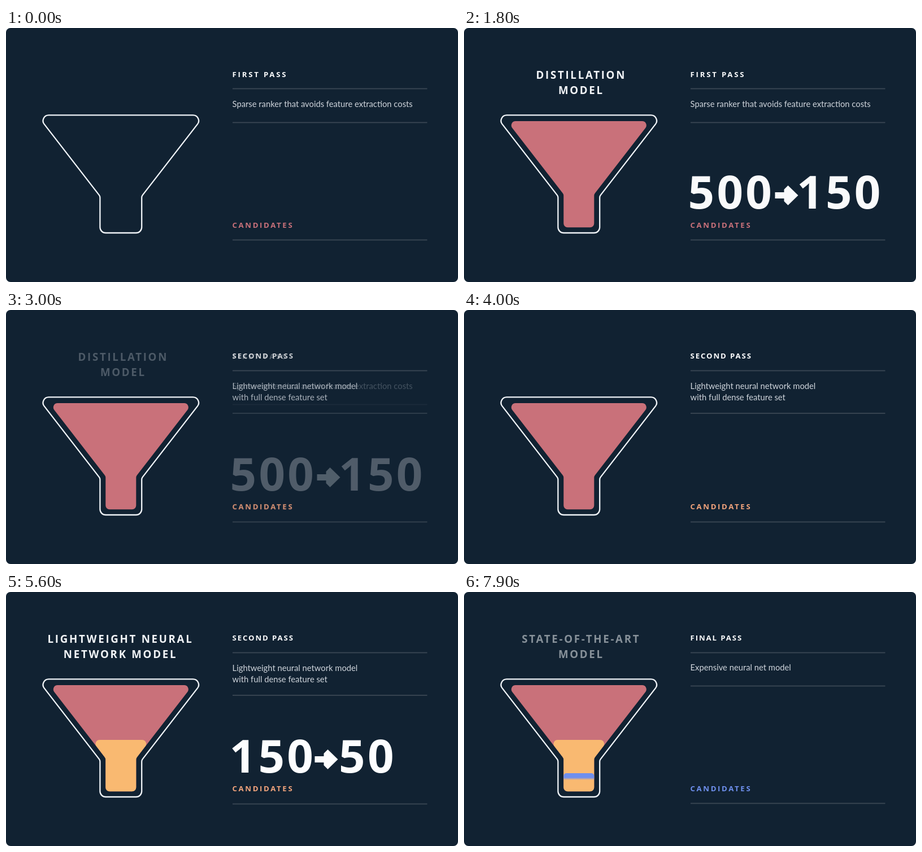
An HTML page with a canvas for the animation above (8000 ms loop, 800 by 450 pixels).

```html
<!DOCTYPE html>
<html lang="en">
<head>
<meta charset="utf-8">
<title>Ranking funnel</title>
<style>
  html, body { margin: 0; width: 100%; height: 100%; overflow: hidden; background: #fff; }
  canvas { display: block; }
</style>
</head>
<body>
<canvas id="stage" width="800" height="450"></canvas>
<script>
const ctx = document.getElementById('stage').getContext('2d');

const LOOP = 8000;
const PERIOD = 3452;
const CENTER = 203.3;
const BACK = '#112232', WHITE = '#fcfdfe', BODY = '#cfd5dc', RULE = '#3a4754';
const LABEL_FONT = '700 13.2px "Open Sans", sans-serif';
const TITLE_FONT = '700 18.7px "Open Sans", sans-serif';
const BODY_FONT = '400 14.75px Lato, sans-serif';
const NUMBER_FONT = '700 81.5px "Open Sans", sans-serif';

const passes = [
  {
    title: ['DISTILLATION', 'MODEL'], titleX: 206,
    label: 'FIRST PASS', labelY: 87, labelGap: 2.8,
    body: ['Sparse ranker that avoids feature extraction costs'], bodyY: 140,
    rules: [167.5, 375.5], accent: '#c9717a', candidatesY: 353.6,
    number: { from: '500', to: '150', x: 396.5, arrowX: 550.5 },
    fill: { color: '#c9717a', top: 165, half: 127.2, radius: 7.4 }
  },
  {
    title: ['LIGHTWEIGHT NEURAL', 'NETWORK MODEL'], titleX: 201.2,
    label: 'SECOND PASS', labelY: 85.7, labelGap: 1.9,
    body: ['Lightweight neural network model', 'with full dense feature set'], bodyY: 140,
    rules: [183, 375.5], accent: '#f2a47c', candidatesY: 352.6,
    number: { from: '150', to: '50', x: 395.5, arrowX: 546.5 },
    fill: { color: '#f9b971', top: 262, half: 52, radius: 7 }
  },
  {
    title: ['STATE-OF-THE-ART', 'MODEL'], titleX: 206,
    label: 'FINAL PASS', labelY: 85.7, labelGap: 1.9,
    body: ['Expensive neural net model'], bodyY: 139,
    rules: [166.5, 374.5], accent: '#6f90ee', candidatesY: 352.6,
    fill: { color: '#6f8fee', top: 321, half: 27, radius: 5 }
  }
];

// Sine ease from 0 to 1, clamped at both ends.
function ease(t, start, duration) {
  const x = Math.min(1, Math.max(0, (t - start) / duration));
  return (1 - Math.cos(Math.PI * x)) / 2;
}

function text(str, x, y, font, color, gap = 0, align = 'left') {
  ctx.font = font;
  ctx.letterSpacing = gap + 'px';
  ctx.textAlign = align;
  ctx.fillStyle = color;
  ctx.fillText(str, x, y);
}

function rule(y) {
  ctx.fillStyle = RULE;
  ctx.fillRect(401, y - 0.9, 344.5, 1.8);
}

// Points are [x, y, corner radius].
function roundedPath(points) {
  const [last, first] = [points[points.length - 1], points[0]];
  ctx.beginPath();
  ctx.moveTo((last[0] + first[0]) / 2, (last[1] + first[1]) / 2);
  points.forEach(([x, y, r], i) => {
    const next = points[(i + 1) % points.length];
    ctx.arcTo(x, y, next[0], next[1], r);
  });
  ctx.closePath();
}

function funnelPath(top, half, radius, neck, shoulder, bottom, bottomRadius) {
  const right = [[half, top, radius]];
  if (half > neck) right.push([neck, shoulder, 7]);
  right.push([neck, bottom, bottomRadius]);
  const left = right.map(([x, y, r]) => [-x, y, r]).reverse();
  roundedPath([...right, ...left].map(([x, y, r]) => [CENTER + x, y, r]));
}

function drawOutline() {
  funnelPath(154.3, 148.1, 10, 36.9, 298, 363, 10);
  ctx.strokeStyle = '#f0f4f8';
  ctx.lineWidth = 2.3;
  ctx.stroke();
}

// Fills downward behind a feathered edge proportional to the height.
function drawFill({ color, top, half, radius }, progress) {
  if (progress <= 0) return;
  const bottom = 353.3, height = bottom - top, feather = height * 0.13;
  const edge = top + (height + feather) * progress;
  ctx.fillStyle = color;
  if (progress < 1) {
    const gradient = ctx.createLinearGradient(0, edge - feather, 0, edge);
    gradient.addColorStop(0, color);
    gradient.addColorStop(1, color + '00');
    ctx.fillStyle = gradient;
  }
  funnelPath(top, half, radius, 27, 294.6, bottom, 7);
  ctx.fill();
}

function drawArrow(x) {
  const upper = [[0, 5.5], [16, 5.5], [16, 10.5], [23, 17.5], [41, 0]];
  const lower = upper.slice(0, -1).reverse().map(([px, py]) => [px, -py]);
  ctx.beginPath();
  [...upper, ...lower].forEach(([px, py]) => ctx.lineTo(x + px, 296.5 - py));
  ctx.fillStyle = WHITE;
  ctx.fill();
}

function drawNumber({ from, to, x, arrowX }) {
  text(from, x, 320, NUMBER_FONT, WHITE, 4.4);
  drawArrow(arrowX);
  text(to, 589, 320, NUMBER_FONT, WHITE, 4.4);
}

function drawPass(pass, visible, titleIn, numberIn) {
  if (visible <= 0) return;
  ctx.globalAlpha = visible;
  text(pass.label, 400.5, pass.labelY, LABEL_FONT, WHITE, pass.labelGap);
  pass.body.forEach((line, i) => text(line, 400.6, pass.bodyY + i * 20, BODY_FONT, BODY));
  pass.rules.forEach(rule);
  text('CANDIDATES', 400.5, pass.candidatesY, LABEL_FONT, pass.accent, 2.65);

  ctx.globalAlpha = visible * titleIn;
  pass.title.forEach((line, i) =>
    text(line, pass.titleX + 1.3, 90 + i * 27, TITLE_FONT, '#f2f5f8', 2.7, 'center'));

  if (pass.number) {
    ctx.globalAlpha = visible * numberIn;
    drawNumber(pass.number);
  }
  ctx.globalAlpha = 1;
}

function draw(now) {
  const t = now % LOOP;
  ctx.clearRect(0, 0, 800, 450);
  ctx.fillStyle = BACK;
  ctx.beginPath();
  ctx.roundRect(0, 0, 800, 450, 8);
  ctx.fill();

  rule(107.5);
  passes.forEach((pass, i) => {
    const start = i * PERIOD;
    const enter = i ? ease(t, start - 1020, 800) : 1;
    const leave = i < 2 ? ease(t, start + 2480, 800) : 0;
    drawFill(pass.fill, ease(t, start + 485, 1320));
    drawPass(pass, enter * (1 - leave), ease(t, start + 584, 800), ease(t, start + 1240, 600));
  });
  drawOutline();
}

function loop() {
  draw(performance.now());
  requestAnimationFrame(loop);
}
loop();
</script>
</body>
</html>
```
